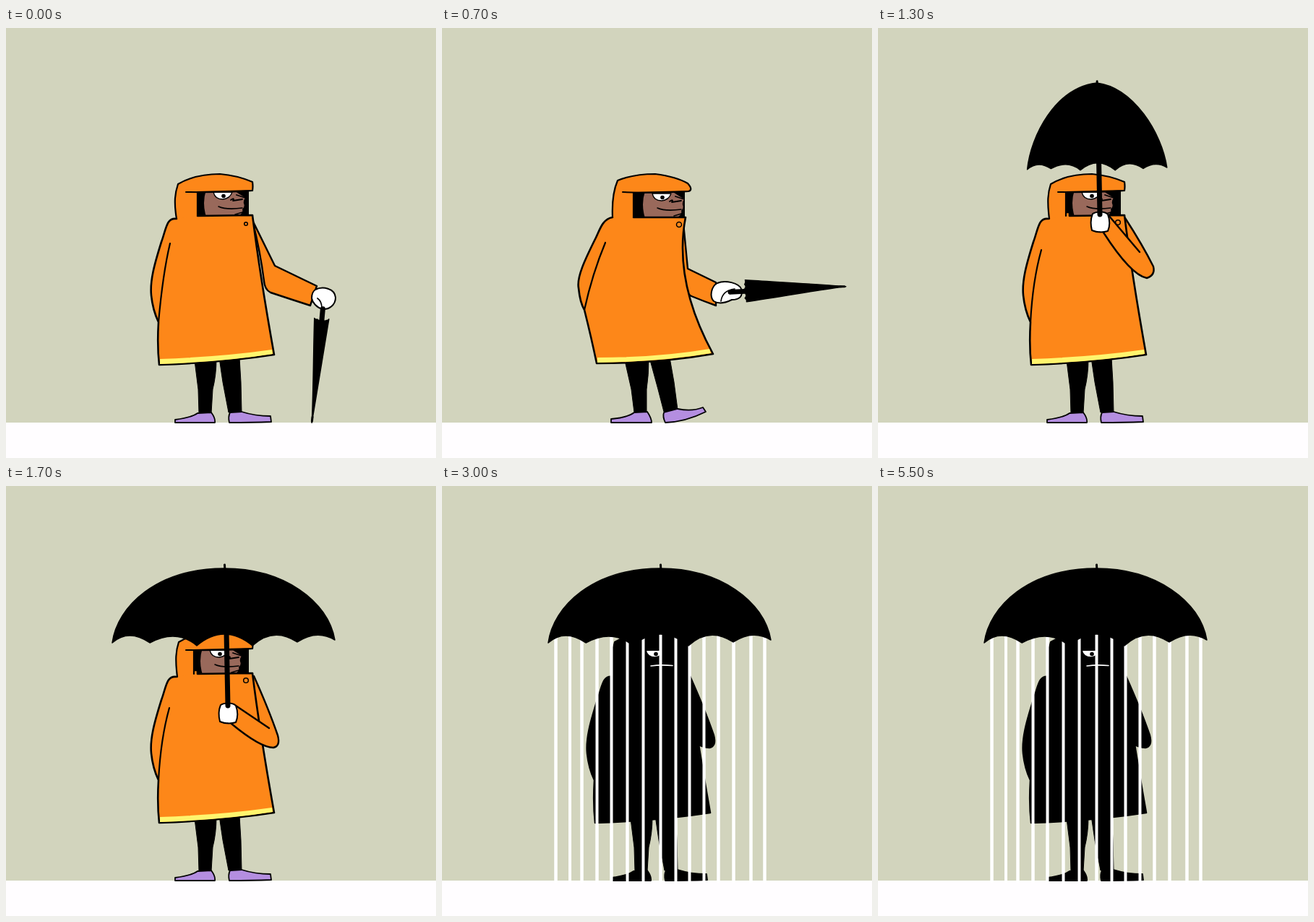
Write an HTML page that moves like this. It is 595 px wide and 595 px high and loops after 6100 ms.

```html
<!DOCTYPE html>
<html lang="en">
<head>
<meta charset="utf-8">
<title>Raincoat and umbrella</title>
<style>
  html, body { margin: 0; width: 100%; height: 100%; overflow: hidden; background: #d2d4bd; }
  svg { display: block; width: 100vw; height: 100vh; }
</style>
</head>
<body>
<svg id="stage" viewBox="0 0 595 595" fill="none" stroke-linejoin="round" stroke-linecap="round"></svg>
<script>
const LOOP = 6100, STEP = 100;
const ORANGE = '#fd8719', YELLOW = '#fff56e', SKIN = '#99695b', PURPLE = '#b48ee0', WHITE = '#ffffff', INK = '#000000';
const BARS = [157.5, 177, 193.5, 214.5, 234.5, 256.5, 278.5, 302.5, 323.5, 342.5, 362.5, 382.5, 403.5, 427.5, 446.5];

// Key poses: every part is a path with the same commands in each pose.
// The canopy is drawn for a grip at 307,315; reach is where its shaft leaves the hand.
const cane = {
  legs: 'M261,460 L266,500 L267,533 L284,533 L286,500 Q291,480 291,458Z M295,456 L300,490 L308,532 L326,532 L325,490 L323,456Z',
  shoeL: 'M234,546 L234,542 Q257,539 265,533 L284,532 Q290,540 289,546Z',
  shoeR: 'M309,546 Q307,538 310,532 L326,531 Q345,537 366,537 L367,545 Q340,546 309,546Z',
  coat: 'M236,264 C222,262 222,277 215,296 C205,328 199,350 201,370 Q203,390 211,407 Q209,440 212,466 Q300,463 371,452 Q351,340 341,259 L265,260 L265,255 L238,255',
  hem: 'M213,458 Q298,455 368,445 L369,451 Q300,462 213,465Z',
  fold: 'M227,298 Q217,340 211,407',
  hood: 'M236,264 C232,240 234,228 238,216 Q262,202 296,202 Q320,204 341,213 Q342,219 341,225 L265,227 L265,260',
  brim: 'M341,225 Q300,228 249,227',
  sleeve: 'M341,266 Q352,310 357,350 Q358,362 366,366 Q393,375 421,384 L430,357 L372,329',
  hand: 'M428,362 C438,357 455,360 456,373 C456,384 446,390 438,389 C430,387 424,380 423,374 C423,368 425,364 428,362Z',
  finger: 'M437,388 Q437,378 431,374',
  canopy: 'M297,279 C299,240 302,170 304,134 C306,170 314,240 317,278 Q315,276 313,277 Q311,275 309,276 Q306,275 304,276 Q301,276 300,277 Q298,277 297,279Z',
  spike: 'M304,136 L304,142',
  button: [332, 271, 2.3], face: [0, 0], grip: [441, 366], angle: 186.6, reach: 292
};
const point = {
  legs: 'M253,460 L262,500 L266,532 L283,531 L283,500 Q286,480 286,458Z M287,456 L299,500 L307,531 L326,528 L321,490 L315,456Z',
  shoeL: 'M234,546 L234,541 Q257,539 266,532 L284,531 Q290,540 290,546Z',
  shoeR: 'M309,546 Q305,538 307,532 L326,527 Q346,531 361,525 L365,531 Q337,545 309,546Z',
  coat: 'M236,262 C222,264 218,280 213,290 C198,320 186,345 189,360 Q191,380 197,390 Q207,430 214,464 Q300,464 375,451 Q320,350 337,262 L265,262 L265,255 L238,255',
  hem: 'M215,456 Q300,456 370,444 L372,450 Q300,462 215,463Z',
  fold: 'M226,297 Q208,340 197,390',
  hood: 'M236,262 C235,240 237,225 243,211 Q265,202 295,202 Q325,206 340,215 Q348,224 341,226 L265,228 L265,262',
  brim: 'M341,226 Q300,229 250,227',
  sleeve: 'M334,270 Q331,315 335,350 Q338,368 345,371 Q362,378 379,384 L379,352 L340,333',
  hand: 'M381,353 C392,348 411,353 414,361 C417,372 411,376 401,376 C393,380 384,383 376,378 C370,372 372,358 381,353Z',
  finger: 'M386,378 Q388,363 405,361',
  canopy: 'M291,273 C295,230 300,170 304,134 C307,170 316,225 321,272 Q318,271 316,274 Q313,271 310,273 Q306,271 303,274 Q300,271 297,274 Q294,272 291,273Z',
  spike: 'M304,136 L304,142',
  button: [328, 272, 3.5], face: [4, 2], grip: [378, 366], angle: 88.3, reach: 294
};
const upright = {
  ...cane,
  coat: 'M237,264 C226,262 223,280 216,296 C206,325 199,345 201,372 Q203,389 213,396 Q209,440 212,465 Q300,464 374,450 Q349,350 338,262 L264,262 L264,255 L239,255',
  hem: 'M213,457 Q298,455 370,444 L372,449 Q300,462 213,464Z',
  fold: 'M228,301 Q218,340 212,396',
  hood: 'M237,264 C235,238 239,222 243,211 Q265,201 295,201 Q325,205 343,216 Q346,221 345,224 L264,226 L264,262',
  brim: 'M345,224 Q300,227 251,225',
  sleeve: 'M338,263 Q362,300 381,341 Q386,348 376,353 Q349,364 323,328 L329,303 L356,328',
  hand: 'M308,303 C314,299 326,300 329,304 C332,312 332,320 329,327 C322,329 314,329 307,326 C305,318 305,310 308,303Z',
  finger: 'M318,328 Q318,328 318,328',
  canopy: 'M296,279 C297,240 300,150 304,134 C308,150 313,240 317,278 Q315,276 313,277 Q311,274 309,275 Q306,273 304,275 Q301,275 300,276 Q298,276 296,279Z',
  button: [329, 271, 4], face: [1, 1], grip: [318, 315], angle: 0, reach: 304
};
const shelter = {
  ...cane,
  fold: 'M226,307 Q214,350 211,407',
  hood: 'M237,264 C234,240 235,228 239,216 Q262,202 296,202 Q320,204 341,213 Q342,219 341,225 L260,227 L260,260',
  sleeve: 'M343,263 Q364,310 376,345 Q380,360 370,362 Q352,362 312,329 L318,304 L364,335',
  hand: 'M297,303 C303,299 315,300 318,304 C321,312 321,320 318,327 C311,329 303,329 296,326 C294,318 294,310 297,303Z',
  finger: 'M307,328 Q307,328 307,328',
  canopy: 'M147,217 C154,166 209,114 302,114 C384,114 446,159 455,213 Q430,198 403,216 Q370,194 341,221 Q302,189 264,221 Q236,197 199,217 Q170,197 147,217Z',
  spike: 'M302.5,109 L303,118',
  button: [332, 269, 3.3], face: [-5, 0], grip: [307, 315], angle: 0, reach: 304
};
const raised = {
  ...shelter,
  sleeve: 'M342,263 Q366,300 381,330 Q384,342 372,346 Q350,342 312,283 L318,258 L362,310',
  hand: 'M297,257 C303,253 315,254 318,258 C321,266 321,274 318,281 C311,283 303,283 296,280 C294,272 294,264 297,257Z',
  finger: 'M307,282 Q307,282 307,282',
  canopy: mix(upright.canopy, shelter.canopy, 0.6),
  spike: mix(upright.spike, shelter.spike, 0.6),
  grip: [307, 269]
};
const KEYS = [[0, cane], [700, point], [1100, upright], [1300, raised], [1400, shelter]];

function clamp(v) { return Math.max(0, Math.min(1, v)); }
function lerp(a, b, u) { return a + (b - a) * u; }
const smooth = u => u * u * (3 - 2 * u);
const overshoot = u => 1 + 2 * (u - 1) ** 3 + (u - 1) ** 2;

function mix(a, b, u) {
  if (typeof a === 'number') return lerp(a, b, u);
  if (Array.isArray(a)) return a.map((v, i) => lerp(v, b[i], u));
  const nums = b.match(/[\d.]+/g);
  let i = 0;
  return a.replace(/[\d.]+/g, n => lerp(+n, +nums[i++], u).toFixed(2));
}

function poseAt(t) {
  const i = KEYS.findIndex(k => k[0] > t);
  if (i < 0) return shelter;
  const [t0, a] = KEYS[i - 1], [t1, b] = KEYS[i];
  const u = (i === 1 ? overshoot : smooth)((t - t0) / (t1 - t0));
  return Object.fromEntries(Object.keys(a).map(k => [k, mix(a[k], b[k], u)]));
}

const path = (d, fill = 'none', width = 2.4, stroke = INK) =>
  `<path d="${d}" fill="${fill}" stroke="${width ? stroke : 'none'}" stroke-width="${width}"/>`;

// Bars fall behind the figure, then step in front of it from left to right.
function rain(t, front) {
  return BARS.map((x, i) => {
    const fall = clamp((t - 1700 - i * 7 % 3 * 100) / 200);
    const overBody = x > 220 && x < 370;
    const hidden = front && overBody && t < (x < 260 ? 2200 : 2400);
    if (!fall || hidden) return '';
    const top = front && overBody && t < 2700 ? 259 : 200;
    return path(`M${x},${top} V${lerp(200, 547, fall)}`, 'none', 4, WHITE);
  }).join('');
}

function face([dx, dy], t, shade, dark) {
  const blink = [231.5, 234, 238, 234, 231.5][(t - 5000) / STEP];
  const lid = blink ? path(`M284,224 H316 V${blink} H284Z`, INK, 0) : '';
  return path(`M257,226 H${lerp(336, 342, dark)} V262 H257Z`, INK, 0) +
    `<g transform="translate(${dx} ${dy})">` +
    path('M277,224 Q271,242 277,261 L320,261 Q329,256 327,251 Q331,247 329,243 Q328,239 331,235 L314,224Z', shade(SKIN), 0) +
    path('M331,235 L319,231 M311,238 Q317,234 314,239 L327,237', 'none', 1.8) +
    path('M294,247 Q305,252 327,249 M317,258 L327,255', 'none', 1.6) +
    path('M287,227 Q289,237 300,237 Q310,236 313,227Z', WHITE, 1.3) +
    `<circle cx="301" cy="232.5" r="2.8" fill="${INK}"/>` + lid + '</g>';
}

function draw(t) {
  const p = poseAt(t);
  const dark = clamp((t - 2600) / 400);
  const shade = hex => 'rgb(' + [1, 3, 5].map(i =>
    Math.round(parseInt(hex.slice(i, i + 2), 16) * (1 - dark))) + ')';
  const coat = shade(ORANGE);
  const folded = t >= 1000;
  const [bx, by, br] = p.button;
  const [gx, gy] = p.grip;
  const held = s => `<g transform="translate(${gx - 307} ${gy - 315}) rotate(${p.angle} 307 315)">${s}</g>`;

  return path('M0,0 H595 V595 H0Z', '#d2d4bd', 0) +
    path('M0,546 H595 V595 H0Z', '#fffdff', 0) +
    rain(t, false) +
    path(p.legs, INK, 1) +
    path(p.shoeL, shade(PURPLE), 1.8) + path(p.shoeR, shade(PURPLE), 1.8) +
    (folded ? path(p.sleeve + ' L330,335 L330,264Z', coat, 0) : path(p.sleeve + 'Z', coat)) +
    face(p.face, t, shade, dark) +
    path(p.coat, coat, 2.6) + path(p.hem, shade(YELLOW), 0) + path(p.fold, 'none', 2.2) +
    path(p.hood, coat, 2.2) + path(p.brim, 'none', 2) +
    `<circle cx="${bx}" cy="${by}" r="${br}" stroke="${INK}" stroke-width="1.5"/>` +
    (folded ? path(p.sleeve, coat) : '') +
    path(p.hand, shade(WHITE), 2) + path(p.finger, 'none', 1.7) +
    held(path(`M307,${p.reach} L305,202`, 'none', 7)) +
    (dark ? `<g opacity="${dark}">${path('M289,249 Q303,247 319,248.5', 'none', 1.6, WHITE)}</g>` : '') +
    rain(t, true) +
    held(path(p.canopy, INK, 1.5) + path(p.spike, 'none', 3));
}

const stage = document.getElementById('stage');
const start = performance.now();
let shown = -1;
function tick() {
  const t = Math.floor((performance.now() - start) % LOOP / STEP) * STEP;
  if (t !== shown) stage.innerHTML = draw(shown = t);
  requestAnimationFrame(tick);
}
tick();
</script>
</body>
</html>
```
